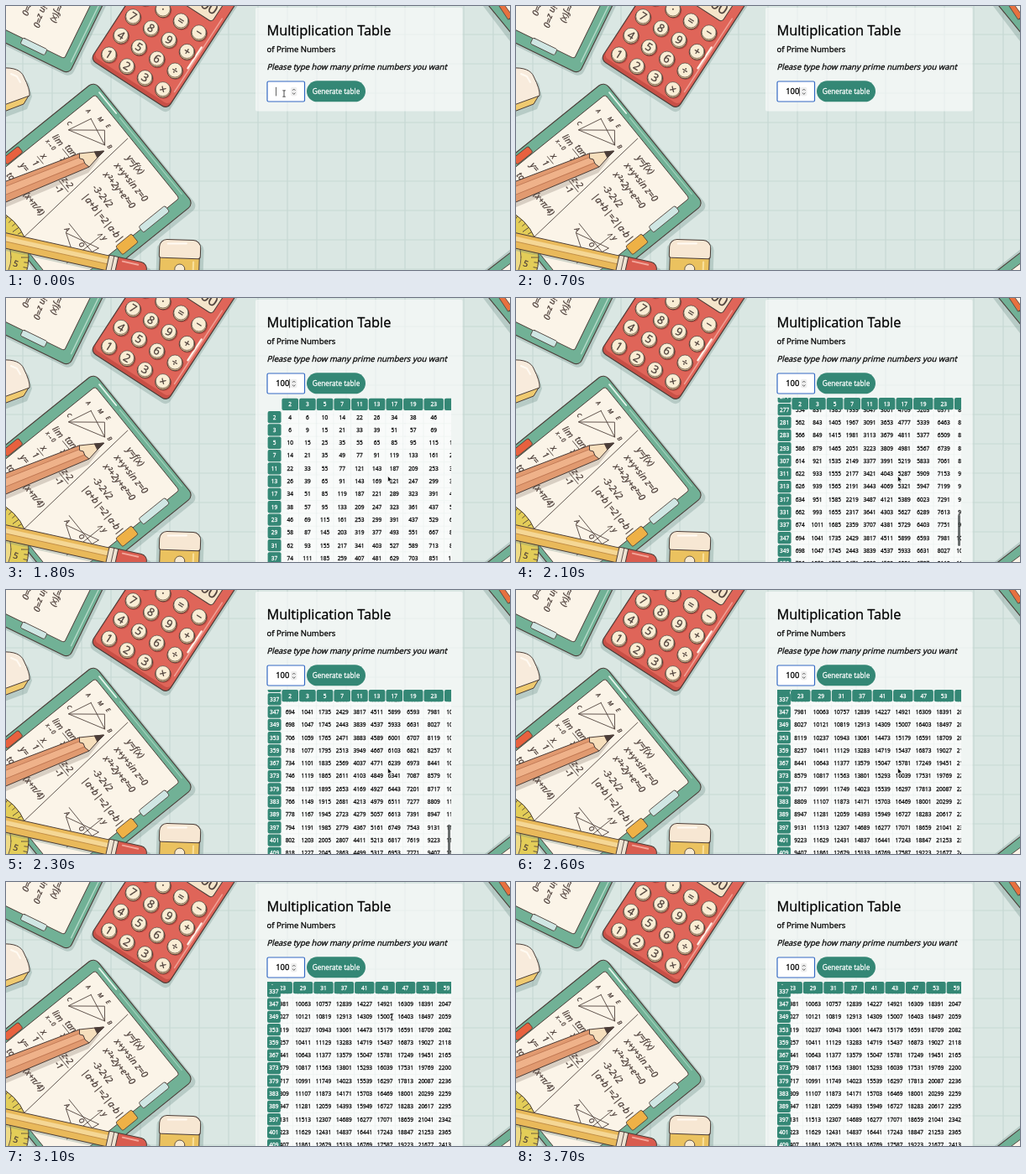
Recreate the animation shown at these times as an HTML page with a canvas. Size 600 px wide and 315 px high, loop 3.8 s.

```html
<!DOCTYPE html>
<html lang="en">
<head>
<meta charset="utf-8">
<title>Multiplication Table</title>
<style>
html, body { margin: 0; width: 100%; height: 100%; overflow: hidden; background: #dae7e3; }
canvas { display: block; width: 600px; height: 315px; }
</style>
</head>
<body>
<canvas id="stage"></canvas>
<script>
const W = 600, H = 315, LOOP = 3800, STEP = 100;
const INK = '#4b3d38', GREEN = '#71b196', PAPER = '#fbf4e8', TEAL = '#348775';
const SANS = '"Open Sans", "Noto Sans", sans-serif';
const dpr = window.devicePixelRatio || 1;

function makeCanvas(el) {
  el.width = W * dpr;
  el.height = H * dpr;
  const c = el.getContext('2d');
  c.scale(dpr, dpr);
  c.lineJoin = c.lineCap = 'round';
  return c;
}

const screen = makeCanvas(document.getElementById('stage'));
const backdrop = document.createElement('canvas');
let g = makeCanvas(backdrop);

function paint(fill, stroke, width = 1) {
  if (fill) { g.fillStyle = fill; g.fill(); }
  if (stroke) { g.strokeStyle = stroke; g.lineWidth = width; g.stroke(); }
}

function poly(pts, fill, stroke, width, open) {
  g.beginPath();
  for (let i = 0; i < pts.length; i += 2) g.lineTo(pts[i], pts[i + 1]);
  if (!open) g.closePath();
  paint(fill, stroke, width);
}

const line = (pts, color, width) => poly(pts, null, color, width, true);

function box(x, y, w, h, r, fill, stroke, width) {
  g.beginPath();
  g.roundRect(x, y, w, h, r);
  paint(fill, stroke, width);
}

function disc(x, y, r, fill, stroke, width) {
  g.beginPath();
  g.arc(x, y, r, 0, 7);
  paint(fill, stroke, width);
}

// A hairline stroke gives the slightly heavy look of smoothed screen text.
function text(str, x, y, size, color, align = 'left', style = '') {
  g.font = `${style} ${size}px ${SANS}`;
  g.fillStyle = g.strokeStyle = color;
  g.textAlign = align;
  g.lineWidth = .3;
  g.fillText(str, x, y);
  g.strokeText(str, x, y);
}

function at(x, y, deg, draw) {
  g.save();
  g.translate(x, y);
  g.rotate(deg * Math.PI / 180);
  draw();
  g.restore();
}

function slanted(str, x, y, size, color) {
  at(x, y, 0, () => {
    g.transform(1, 0, -.25, 1, 0, 0);
    text(str, 0, 0, size, color);
  });
}

const note = (str, x, y, size = 10.5) => text(str, x, y, size, INK, 'left', 'italic');

// Backdrop

const SHADE = 'rgba(105,135,130,.3)';

function drawGrid() {
  g.fillStyle = '#dae7e3';
  g.fillRect(0, 0, W, H);
  for (let x = 20; x < W; x += 35) line([x, 0, x, H], '#c7d9d4', 1.2);
  for (let y = 34; y < H; y += 35) line([0, y, W, y], '#c7d9d4', 1.2);
}

function drawUpperPad() {
  at(75, 81, 26, () => {
    box(-146, -150, 150, 153, 8, SHADE);
    box(-150, -150, 150, 150, 7, GREEN, INK, 1.1);
    line([-4, -120, -4, -14], '#b4dac8', 1.4);
    box(-150, -150, 137, 136, 3, PAPER, INK, .9);
    box(-68, -15, 32, 8, 2, '#cfe6e3', INK, .8);
  });
  at(65, -6, 112, () => {
    note('y=f(x)', 2, 2);
    note('+sin z=0', 2, 19);
    note('+eᶻ=0', 6, 37);
  });
}

function drawCalculator() {
  at(192, 123, 33, () => {
    box(-109, -155, 112, 160, 7, SHADE);
    box(-109, -160, 109, 160, 7, '#c84f46', INK, 1.1);
    box(-108, -160, 107, 155, 6, '#df6559');
    line([-4, -126, -4, -22], '#f0a096', 1.6);
    line([-6, -84, -6, -54], '#fff1e8', 2.2);
    box(-92, -152, 80, 36, 4, '#f5e5ca', INK, 1);
    text('00', -35, -124, 18, INK);
  });
  const rows = ['123×', '456÷', '789+', '0·=−'];
  rows.forEach((row, r) => [...row].forEach((key, c) => {
    const x = 122.6 + 21.4 * c + 14.3 * r, y = 57.8 + 13.9 * c - 22.6 * r;
    disc(x + 1, y + 1.8, 9.4, '#b9483f');
    disc(x, y + .7, 9.2, '#dcb98d', INK, .9);
    disc(x, y - .4, 8.5, '#faedd4', INK, .6);
    at(x, y, 32, () => text(key, 0, 4.4, 13, INK, 'center'));
  }));
}

function drawLeftEraser() {
  poly([-5, 78, 14, 79, 27, 92, 31, 108, 25, 123, -5, 134], SHADE);
  poly([-5, 105, 27, 107, 21, 117, -5, 127], '#efca70', INK, 1);
  g.beginPath();
  g.moveTo(-5, 74);
  g.bezierCurveTo(10, 73, 18, 77, 21, 84);
  g.quadraticCurveTo(29, 100, 28, 107);
  g.lineTo(-5, 119);
  paint('#f8ebdc', INK, 1);
  line([6, 81, 13, 84, 17, 91], '#fffaf2', 2);
}

function drawMainPad() {
  at(105, 90, 51, () => {
    box(4, -2, 190, 200, 8, SHADE);
    box(0, 0, 188, 195, 8, GREEN, INK, 1.1);
    line([14, 3.6, 46, 3.6], '#e3f4ea', 1.8);
    line([53, 3.6, 170, 3.6], '#9bcdb6', 1.4);
    box(13, 9, 159, 180, 3, PAPER, INK, .9);
    box(168, 28, 9, 40, 2, '#cfe6e3', INK, .8);
    box(169, 80, 13, 24, 2, '#eeb146', INK, .8);
    box(3, 119, 9, 24, 2, '#e8613f', INK, .8);
    line([78, 12, 92, 185], INK, .8);

    poly([32, 31, 67, 38, 26, 60], null, INK, .8);
    line([26, 60, 53, 27, 67, 38], INK, .8);
    note('A', 21, 30, 7);
    note('M', 37, 25, 7);
    note('E', 50, 23, 7);
    note('B', 70, 37, 7);
    note('C', 18, 57, 7);

    note('lim', 20, 81);
    note('tanx', 39, 77);
    line([39, 80, 62, 80], INK, .8);
    note('x', 47, 90);
    note('x→0', 19, 90, 7);
    note('x', 29, 106);
    line([27, 109, 38, 109], INK, .8);
    note('1', 29, 119);
    note('=', 57, 110);
    note('z-2', 67, 104);
    line([66, 107, 83, 107], INK, .8);
    note('-1', 69, 117);
    note('y=', 22, 132);
    note('tan', 21, 152);
    note('(x+π/4)', 52, 151);

    note('y=f(x)', 95, 28, 11);
    note('x+y+sin z=0', 93, 45, 11);
    note('x²+2y+eᶻ=0', 93, 62, 11);
    note('-3-2√2', 97, 82, 11);
    note('|a+b|=2|a-b|', 97, 98, 11);

    line([113, 130, 162, 130], INK, .8);
    line([148, 162, 148, 107, 145, 112], INK, .8);
    poly([119, 140, 158, 121, 153, 152], null, INK, .8);
    note('A', 115, 139, 8);
    note('y', 151, 111, 9);
    note('O', 139, 137, 8);
  });
}

function drawPencil() {
  poly([0, 219, 86, 185, 112, 181, 98, 199, 0, 240], 'rgba(90,75,65,.22)');
  poly([-5, 211, 87, 176, 99, 192, -5, 236], '#e19a70', INK, 1);
  poly([-5, 217, 89, 180, 94, 186, -5, 227], '#efb28a');
  line([-5, 217, 89, 180], '#b9714f', .8);
  line([-5, 227, 94, 187], '#b9714f', .8);
  poly([87, 176, 116, 173, 99, 192, 94, 188, 92, 183, 88, 182], '#f6dfbd', INK, 1);
  poly([105, 174, 117, 173, 109, 181], INK, INK, .8);
}

function drawProtractor() {
  const x = -34, y = 300;
  disc(x, y, 61, '#e3cd58', INK, 1);
  disc(x, y, 40, '#eeda86', INK, .8);
  for (let i = -10; i < 5; i++) {
    at(x, y, i * 6, () => line([i % 3 ? 56 : 52, 0, 60, 0], INK, .8));
  }
  at(9, 306, 20, () => text('5', 0, 4, 10, INK));
}

function drawEraserPencil() {
  at(0, 279, 12.5, () => {
    box(-10, -4, 188, 17, 6, SHADE);
    box(-10, -8, 136, 18, 0, '#e9b95a', INK, 1);
    g.fillStyle = '#f5d795';
    g.fillRect(-10, -4, 135, 6);
    line([-10, 2, 125, 2], '#bd8942', .8);
    box(124, -9, 12, 20, 2, '#eee3d2', INK, 1);
    line([130, -9, 130, 11], INK, .8);
    box(135, -9, 36, 20, [0, 8, 8, 0], '#d95c4f', INK, 1);
    line([141, -5, 160, -5], '#f3a69a', 1.8);
  });
}

function drawLowerEraser() {
  at(207, 279, 2, () => {
    box(-27, 3, 56, 50, 9, SHADE);
    box(-23, 17, 47, 40, 0, '#ebc25f', INK, 1);
    box(-24, 0, 49, 22, [9, 9, 3, 3], '#f7e7d3', INK, 1);
    line([-14, 5, 8, 4], '#fffaf2', 2.2);
    line([17, 26, 17, 40], '#f8df9a', 2.2);
    disc(1, 35, 6, '#f8ebd2', INK, .8);
  });
}

function drawRightCorners() {
  poly([568, 0, 600, 42, 606, 0], SHADE);
  poly([570, -6, 606, 38, 606, -6], GREEN, INK, 1.1);
  poly([583, -6, 606, 24, 606, -6], PAPER, INK, .9);
  poly([584, -4, 590, -6, 603, 12, 598, 16], '#e8713f', INK, .8);
  poly([566, 318, 606, 286, 606, 318], SHADE);
  poly([570, 318, 606, 290, 606, 318], GREEN, INK, 1.1);
  poly([586, 318, 606, 303, 606, 318], PAPER, INK, .9);
}

drawGrid();
drawUpperPad();
drawCalculator();
drawLeftEraser();
drawMainPad();
drawPencil();
drawProtractor();
drawEraserPencil();
drawLowerEraser();
drawRightCorners();
g = screen;

// Table

const primes = [];
for (let n = 2; primes.length < 100; n++) {
  if (primes.every(p => n % p)) primes.push(n);
}

const FONT = 6.53, DIGIT = 3.73, PAD = 4.73, GAP = 1.02, ROW = 15.3, CELL = ROW - GAP;
const VIEW = { x: 311, y: 119, w: 219, h: 240 };
const cols = [];
let nextX = 328.4;
for (const p of primes) {
  const w = String(p * 541).length * DIGIT + PAD;
  cols.push({ p, x: nextX, w });
  nextX += w + GAP;
}

function cell(str, x, y, w, head) {
  if (head) box(x, y, w, CELL, 2, TEAL);
  else {
    g.fillStyle = 'rgba(255,255,255,.6)';
    g.fillRect(x, y, w, CELL);
  }
  text(str, x + w / 2, y + CELL / 2 + 2.4, FONT, head ? '#fff' : '#111', 'center');
}

function drawTable(sx, sy, bar) {
  g.save();
  g.beginPath();
  g.rect(VIEW.x, VIEW.y, VIEW.w, VIEW.h);
  g.clip();
  const rows = primes
    .map((p, i) => ({ p, y: 135 + ROW * i - sy }))
    .filter(r => r.y > VIEW.y - ROW && r.y < H);
  const shown = cols
    .map(c => ({ ...c, x: c.x - sx }))
    .filter(c => c.x + c.w > VIEW.x && c.x < VIEW.x + VIEW.w);
  for (const r of rows) for (const c of shown) cell(r.p * c.p, c.x, r.y, c.w);
  const top = Math.max(VIEW.y, 119.8 - sy);
  for (const c of shown) cell(c.p, c.x, top, c.w, true);
  const left = Math.max(VIEW.x, 311.6 - sx);
  for (const r of rows) cell(r.p, left, r.y, 3 * DIGIT + PAD, true);
  if (bar > 0) {
    box(526, VIEW.y + sy * .155, 3, 38, 1.5, `rgba(70,75,75,${.8 * bar})`);
  }
  g.restore();
}

// Form

function drawForm(value, caret) {
  text('Multiplication Table', 310.5, 34.5, 16.32, '#000');
  text('of Prime Numbers', 310.5, 55, 9.55, '#000');
  slanted('Please type how many prime numbers you want', 310.5, 76, 9.55, '#000');
  box(311, 90, 44.5, 24, 1.5, '#fff', '#3469c4', 1.2);
  text(value, 321.2, 105.3, 9.4, '#000');
  if (caret) {
    const x = 321.5 + g.measureText(value).width;
    line([x, 97, x, 107], '#222', .7);
  }
  box(339, 96.8, 7.4, 10.6, 2, '#efefef');
  line([341.2, 100.6, 342.7, 99, 344.2, 100.6], '#444', .8);
  line([341.2, 103.8, 342.7, 105.4, 344.2, 103.8], '#444', .8);
  box(358, 89.3, 70, 25, 12.5, TEAL);
  text('Generate table', 393, 104.8, 8.16, '#fff', 'center');
}

function drawBeam(x, y) {
  line([x, y - 3.5, x, y + 3.5], '#222', .8);
  line([x - 1.5, y - 3.7, x + 1.5, y - 3.7], '#222', .7);
  line([x - 1.5, y + 3.7, x + 1.5, y + 3.7], '#222', .7);
}

function drawArrow(x, y) {
  poly([x, y, x, y + 7, x + 1.6, y + 5.6, x + 2.7, y + 8, x + 3.8, y + 7.5, x + 2.8, y + 5.2, x + 5, y + 5],
    '#111', '#fff', .6);
}

// Timing

const ramp = (t, a, b) => Math.min(1, Math.max(0, (t - a) / (b - a)));
const easeOut = (u, power) => 1 - (1 - u) ** power;
const mix = (a, b, u) => a + (b - a) * u;

function drawPointer(t) {
  if (t < 300) drawBeam(331, 104.5);
  else if (t >= 1300 && t < 2800) {
    const u = easeOut(ramp(t, 1200, 1700), 2);
    drawArrow(mix(340, 454.5, u), mix(108, 212.5, u));
  } else if (t >= 2800 && t < 3200) {
    const u = ramp(t, 2700, 3100);
    drawBeam(mix(455, 459.5, u), mix(214, 161, u));
  }
}

function draw(t) {
  g.drawImage(backdrop, 0, 0, W, H);
  const ready = t >= 800;
  box(297, 2, 246.5, ready ? 330 : 123.5, 2, 'rgba(255,255,255,.6)');
  const typed = (t >= 300) + (t >= 400) + (t >= 600);
  drawForm('100'.slice(0, typed), t < 1900);
  if (ready) {
    const sy = 1037 * easeOut(ramp(t, 1800, 2300), 2.18);
    const sx = 180 * easeOut(ramp(t, 2300, 2800), 3.2);
    drawTable(sx, sy, t > 1800 ? 1 - ramp(t, 2300, 2500) : 0);
  }
  drawPointer(t);
}

const start = performance.now();
let last = -1;
function tick() {
  const t = Math.floor((performance.now() - start) % LOOP / STEP) * STEP;
  if (t !== last) draw(last = t);
  requestAnimationFrame(tick);
}
tick();
document.fonts.ready.then(() => draw(last));
</script>
</body>
</html>
```
